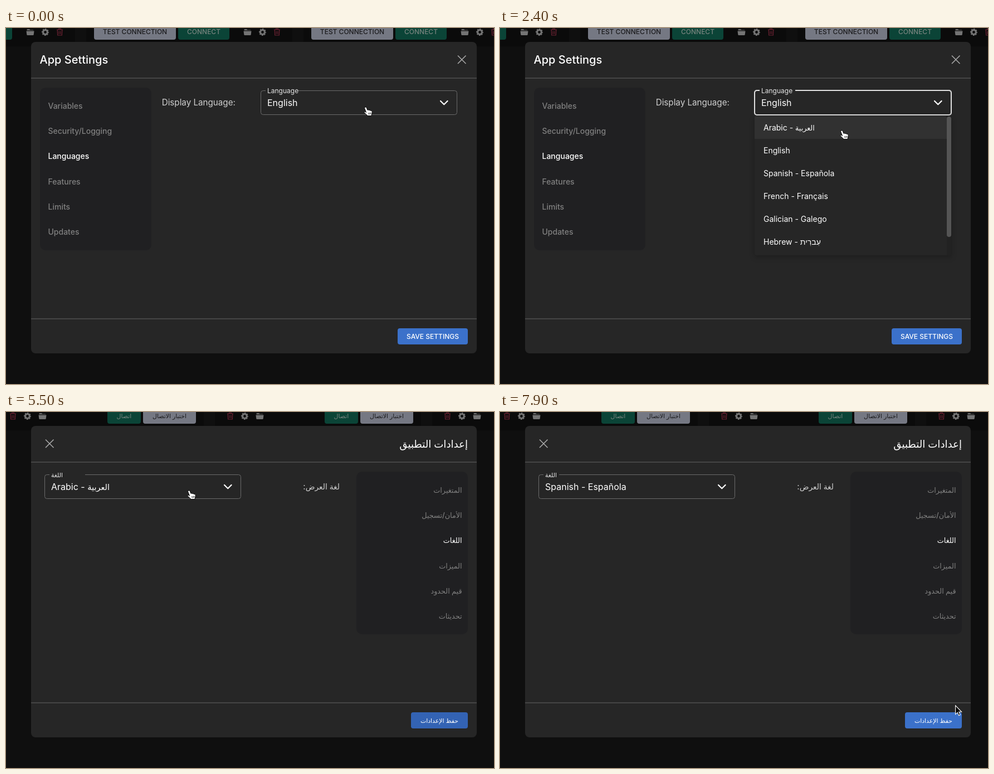
Recreate the animation shown at these times as an HTML page. Size 876 px wide and 639 px high, loop 8 s.

```html
<!DOCTYPE html>
<html lang="en">
<head>
<meta charset="utf-8">
<style>
  html, body { margin: 0; width: 100%; height: 100%; overflow: hidden; background: #0f0f0f; }
  svg { display: block; font-family: Inter, 'Liberation Sans', 'DejaVu Sans', 'Noto Sans CJK SC', sans-serif; }
  text { white-space: pre; }
  #menu { filter: drop-shadow(0 3px 5px rgba(0, 0, 0, .25)); }
</style>
</head>
<body>
<svg id="stage" width="876" height="639" viewBox="0 0 876 639"></svg>
<script>
const LOOP = 8000, ROW = 41, MAX_SCROLL = 37;
const ARABIC = 'Arabic - العربية', SPANISH = 'Spanish - Española';
const languages = [ARABIC, 'English', SPANISH, 'French - Français',
  'Galician - Galego', 'Hebrew - עִברִית', 'Simplified Chinese - 简体中文'];

const rect = (x, y, w, h, fill, r = 0, more = '') =>
  `<rect x="${x}" y="${y}" width="${w}" height="${h}" rx="${r}" fill="${fill}" ${more}/>`;

// Arabic runs fall back to a wider face, so they are set a little smaller.
const sized = (s, size) => s.replace(/[\u0600-\u06ff][\u0600-\u06ff \/]*/g,
  run => `<tspan font-size="${size * .91}">${run}</tspan>`);

const text = (x, y, size, s, fill, more = '') =>
  `<text x="${x}" y="${y}" font-size="${size}" fill="${fill}" ${more}>${sized(s, size)}</text>`;

const centered = (x, y, s, fill, more = '') =>
  text(x, y, 12, s, fill, `text-anchor="middle" font-weight="500" ${more}`);

const button = (x, w, s, fill, color) =>
  rect(x, -8, w, 29, fill, 4) + centered(x + w / 2, 11, s, color);

const at = (x, shape) => `<g transform="translate(${x} 7.5)">${shape}</g>`;
const folder = x => at(x, `<path d="M-6-3.2V-4.4Q-6-5.5-5-5.5H-1.5L0-4H5Q6-4 6-3.2Z M-7-2H7L6.2 4.5Q6 5.5 5 5.5H-5Q-6 5.5-6.2 4.5Z" fill="#747474"/>`);
const gear = x => at(x, `<g fill="none" stroke="#747474"><circle r="3.9" stroke-width="3"/>
  <circle r="5.6" stroke-width="1.8" stroke-dasharray="2.5 1.9" stroke-dashoffset="1.2"/></g>`);
const trash = x => at(x, `<path d="M-5.5-4.5H5.5M-2-4.5V-6H2V-4.5M-4.3-4.5L-3.8 5.5H3.8L4.3-4.5M-1.4-2V3.5M1.4-2V3.5" fill="none" stroke="#6d2233" stroke-width="1.2"/>`);

function page(id, p) {
  let s = '';
  for (let i = -1; i < 3; i++) {
    const o = i * 390;
    s += rect(p.card + o, -10, 370, 43, '#0b0b0b') +
      button(p.test[0] + o, p.test[1], p.test[2], '#757883', '#1b1b1d') +
      button(p.connect[0] + o, p.connect[1], p.connect[2], '#0b4437', '#78847f') +
      folder(p.folder + o) + gear(p.gear + o) + trash(p.trash + o);
  }
  const anchor = `text-anchor="${p.anchor}"`;
  s += rect(45, 25, 800, 559, '#262626', 8) +
    rect(45, 89, 800, 2, '#454545') + rect(45, 521, 800, 2, '#454545') +
    text(p.title[0], 64, 20, p.title[1], '#fff', anchor + ' font-weight="500"') +
    `<path d="M${p.close} 49.5l14.5 14.5m0-14.5l-14.5 14.5" stroke="#a8a8a8" stroke-width="1.6"/>` +
    rect(p.side, 107, 200, 292, '#202022', 10) +
    text(p.label[0], 139, 15.2, p.label[1], '#d0d0d0', anchor);
  p.tabs.forEach((tab, i) => s += text(p.tabX, 145 + i * 45.2, 14, tab,
    i == 2 ? '#fff' : '#808080', anchor + ' font-weight="500"'));
  return `<g id="${id}">${s}</g>`;
}

const ltr = page('ltr', {
  card: 144, test: [158, 147, 'TEST CONNECTION'], connect: [309, 92, 'CONNECT'],
  folder: 433.5, gear: 460.5, trash: 486.5, anchor: 'start', title: [60.5, 'App Settings'],
  close: 811, side: 61, label: [279.7, 'Display Language:'], tabX: 75.5,
  tabs: ['Variables', 'Security/Logging', 'Languages', 'Features', 'Limits', 'Updates']
});
const rtl = page('rtl', {
  card: 375, test: [636, 95, 'اختبار الاتصال'], connect: [572, 60, 'اتصال'],
  folder: 455.5, gear: 428.5, trash: 402.5, anchor: 'end', title: [829, 'إعدادات التطبيق'],
  close: 71, side: 629, label: [599, 'لغة العرض:\u200f'], tabX: 818.5,
  tabs: ['المتغيرات', 'الأمان/تسجيل', 'اللغات', 'الميزات', 'قيم الحدود', 'تحديثات']
});

const field = `<g id="field">
  ${rect(457.5, 112.5, 352, 43, 'none', 4, 'id="border" stroke="#6a6a6a"')}
  ${rect(457, 112, 353, 44, 'none', 4, 'id="focus" stroke="#fff" stroke-width="2"')}
  ${rect(466, 110, 64, 4, '#262626', 0, 'id="notch"')}
  ${text(469, 117, 12, '', '#e6e6e6', 'id="caption"')}
  ${text(469, 140, 16, '', '#fff', 'id="value"')}
  <path d="M780 131l6.3 6.3 6.3-6.3" fill="none" stroke="#fff" stroke-width="2.2" stroke-linecap="round" stroke-linejoin="round"/>
  <g id="menu">
    ${rect(457, 158, 353, 250, '#262626', 4)}
    <g clip-path="url(#clip)"><g id="list">
      ${rect(457, 158, 345, ROW, '#313131', 0, 'id="hover"')}
      ${languages.map((s, i) => text(473, 184 + i * ROW, 14, s, '#fff')).join('')}
    </g></g>
    ${rect(802, 158, 8, 250, '#222')}
    ${rect(802, 159, 8, 216, '#555', 4, 'id="thumb"')}
  </g></g>`;

const cursors = `
  <g id="arrow"><path d="M.6.8V16.6L4.2 13.3 6.6 18.7 9.1 17.6 6.8 12.3H11.6Z" fill="#000" stroke="#fff" stroke-width="1.1"/></g>
  <g id="hand"><path d="M1.7 3.2C1 1 4.4-.2 5.3 2.2L7 6.4C8 5.4 9.4 5.9 9.7 7 10.8 6 12 6.5 12.4 7.7 13.7 7 15.2 8 15.2 9.6 15.2 12 14.6 14 13.8 16.6H7.2C5.5 14.4 3 13 1.2 10.8.3 9.4 2.2 8.6 3.4 9.6L4.5 10.5Z" fill="#fff" stroke="#000"/>
  <path d="M8.4 11.2l.9 3.2M10.5 10.8l.8 3.2M12.5 10.6l.5 3" stroke="#000" stroke-width=".8"/></g>`;

document.getElementById('stage').innerHTML =
  `<clipPath id="clip">${rect(457, 158, 345, 250, '#000', 4)}</clipPath>` + ltr + rtl +
  rect(703, 539, 126, 29, '#3b71ca', 4, 'id="save"') +
  centered(766, 558, '', '#fff', 'id="saveText"') + field + cursors;

const el = {};
document.querySelectorAll('[id]').forEach(e => el[e.id] = e);
const set = (id, attrs) => { for (const k in attrs) el[id].setAttribute(k, attrs[k]); };
const write = (id, s, size) => {
  if (el[id].dataset.s !== s) { el[id].innerHTML = sized(s, size); el[id].dataset.s = s; }
};
const show = (id, on) => set(id, { visibility: on ? 'visible' : 'hidden' });
const ramp = (t, a, b) => Math.min(1, Math.max(0, (t - a) / (b - a)));
const ease = u => u * u * (3 - 2 * u);

// time, x, y
const path = [[0, 642, 141], [550, 642, 141], [1100, 635, 203], [1900, 635, 203], [2100, 610, 183],
  [2550, 610, 183], [2900, 800, 440], [3000, 839, 495], [3100, 836, 505], [3300, 801, 538],
  [3400, 785, 546], [3700, 785, 546], [3900, 761, 422], [4800, 761, 422], [5100, 555, 409],
  [5200, 555, 409], [5300, 333, 157], [5450, 333, 157], [5500, 325, 140], [6400, 325, 140],
  [6900, 284, 243], [7050, 284, 243], [7100, 286, 245], [7550, 286, 245], [7900, 817, 526], [LOOP, 817, 526]];

function pointer(t) {
  const i = path.findIndex(k => k[0] > t), a = path[i - 1], b = path[i];
  const u = ramp(t, a[0], b[0]);
  return [a[1] + (b[1] - a[1]) * u, a[2] + (b[2] - a[2]) * u];
}

function draw(t) {
  const arabic = t >= 4100, narrow = t >= 4400;
  show('ltr', !arabic);
  show('rtl', arabic);

  const dark = ramp(t, 3350, 3500) * (1 - ramp(t, 5980, 6150));
  const mix = (a, b) => Math.round(a + (b - a) * dark);
  set('save', { x: narrow ? 727 : 703, width: narrow ? 102 : 126,
    fill: `rgb(${mix(59, 51)},${mix(113, 99)},${mix(202, 180)})` });
  set('saveText', { x: narrow ? 778 : 766 });
  write('saveText', arabic ? 'حفظ الإعدادات' : 'SAVE SETTINGS', 12);

  set('field', { transform: `translate(${arabic ? -388 : 0})` });
  write('caption', arabic ? 'اللغة' : 'Language', 12);
  write('value', t < 2450 ? 'English' : t < 7550 ? ARABIC : SPANISH, 16);
  set('notch', { width: t < 300 ? 59 : t < 5980 ? 64 : 28 });
  set('focus', { opacity: ramp(t, 280, 400) - ramp(t, 2350, 2650) +
    ramp(t, 5980, 6100) - ramp(t, 7480, 7780) });

  const open = ease(ramp(t, 280, 480)) - ease(ramp(t, 2400, 2600)) +
    ease(ramp(t, 5980, 6180)) - ease(ramp(t, 7480, 7680));
  set('menu', { opacity: open, transform: `translate(0 158) scale(1 ${.8 + .2 * open}) translate(0 -158)` });
  const scroll = ease(ramp(t, 1100, 1500)) - ease(ramp(t, 1600, 2100));
  set('list', { transform: `translate(0 ${-MAX_SCROLL * scroll})` });
  set('thumb', { y: 159 + 32 * scroll });

  const [x, y] = pointer(t);
  const hand = t < 2550 || t >= 3400 && t < 3750 || t >= 5500 && t < 7600;
  show('hand', hand);
  show('arrow', !hand);
  set(hand ? 'hand' : 'arrow', { transform: `translate(${x} ${y})` });

  const row = t < 1900 ? (y > 199 ? 1 : y > 157 ? 0 : -1) : Math.floor((y - 158) / ROW);
  set('hover', { y: 158 + row * ROW, opacity: row < 0 ? 0 : 1 });
}

function frame() {
  draw(performance.now() % LOOP);
  requestAnimationFrame(frame);
}
frame();
</script>
</body>
</html>
```
